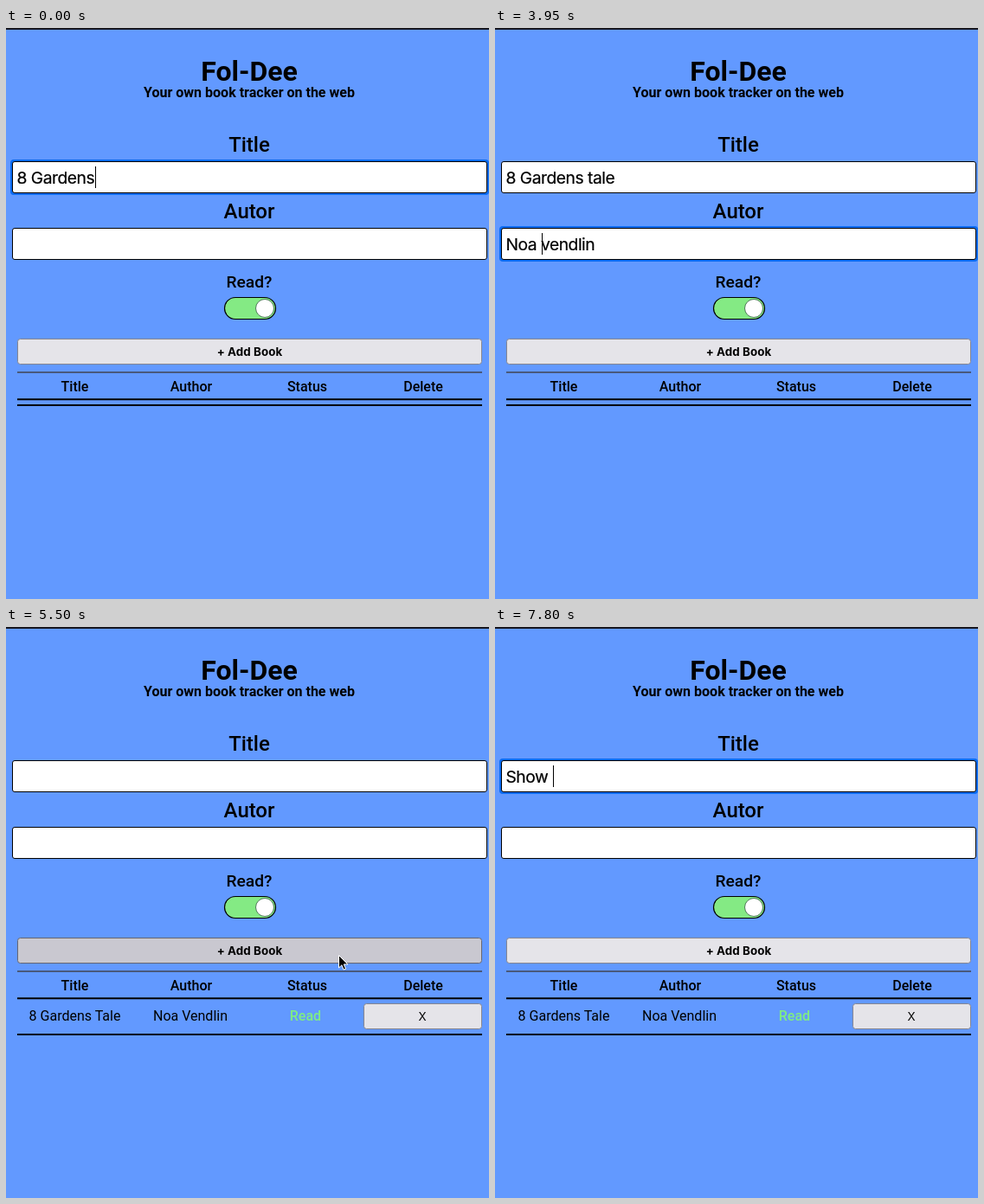
An HTML page for the animation above (8000 ms loop, 558 by 660 pixels).

```html
<!DOCTYPE html>
<html lang="en">
<head>
<meta charset="utf-8">
<title>Book tracker</title>
<style>
  html, body { margin: 0; width: 100%; height: 100%; overflow: hidden; background: #6299ff; }
  svg { display: block; }
  text { font: 16px Roboto, sans-serif; text-anchor: middle; white-space: pre; }
  .bold { font-weight: 700; }
  .medium { font-weight: 500; }
  .label { font-size: 24px; font-weight: 500; }
  .field { fill: #fff; stroke: #000; }
  .ring { fill: #0b6cf3; }
  .typed { font: 19.3px Inter, sans-serif; letter-spacing: -.5px; text-anchor: start; stroke: #000; stroke-width: .2; }
  .button { fill: #e5e4e9; stroke: #85858f; }
  .button.hover { fill: #c9c8d0; stroke: #666670; }
  .ui { font: 13.33px Inter, sans-serif; }
  .ui.bold { font-weight: 700; letter-spacing: .1px; }
</style>
</head>
<body>
<svg width="558" height="660" viewBox="0 0 558 660">
  <rect width="558" height="660" fill="#6299ff"/>
  <rect width="558" height="2" fill="#15161f"/>

  <text class="bold" x="281" y="61" style="font-size:32px">Fol-Dee</text>
  <text class="bold" x="281" y="80">Your own book tracker on the web</text>

  <text class="label" x="281" y="143">Title</text>
  <rect class="ring" id="titleRing" x="5" y="152" width="553" height="41" rx="4"/>
  <rect class="field" x="7.5" y="154.5" width="548" height="36" rx="2.5"/>
  <text class="typed" id="title" x="12.5" y="180"></text>

  <text class="label" x="281" y="220">Autor</text>
  <rect class="ring" id="authorRing" x="5" y="229" width="553" height="41" rx="4"/>
  <rect class="field" x="7.5" y="231.5" width="548" height="36" rx="2.5"/>
  <text class="typed" id="author" x="12.5" y="257"></text>
  <rect id="caret" width="1" height="25"/>

  <text class="medium" x="281" y="300" style="font-size:19.2px">Read?</text>
  <rect x="252.5" y="311.5" width="59" height="25" rx="12.5" fill="#84ea84" stroke="#000" stroke-width="1.2"/>
  <circle cx="299" cy="324" r="10.5" fill="#fff" stroke="#4f7b58"/>

  <rect class="button" id="add" x="13.5" y="359.5" width="536" height="29" rx="3"/>
  <text class="ui bold" x="281.5" y="379">+ Add Book</text>

  <path d="M13 398H550" stroke="#40444f" stroke-width="1.6"/>
  <path d="M13 429.3H550" stroke="#000" stroke-width="2"/>
  <text class="medium" x="79.5" y="420">Title</text>
  <text class="medium" x="214" y="420">Author</text>
  <text class="medium" x="348" y="420">Status</text>
  <text class="medium" x="482" y="420">Delete</text>
  <path id="tableEnd" d="M13 0H550" stroke="#000" stroke-width="2"/>
  <g id="row">
    <text x="79.5" y="455">8 Gardens Tale</text>
    <text x="213" y="455">Noa Vendlin</text>
    <text class="medium" x="346" y="455" fill="#7fec84">Read</text>
    <rect class="button" x="413.5" y="435.5" width="136" height="29" rx="3"/>
    <text class="ui" x="481" y="455">X</text>
  </g>

  <path id="arrow" d="M0 0V14.5L3.4 11.3 5.6 16.6 8 15.6 5.8 10.4H10.4Z" stroke="#fff"/>
  <path id="beam" d="M-3.5 -7.5Q0 -7.5 0 -5.5Q0 -7.5 3.5 -7.5M0 -6V6M-3.5 7.5Q0 7.5 0 5.5Q0 7.5 3.5 7.5M-2 1H2"
        fill="none" stroke="#000"/>
</svg>
<script>
const $ = id => document.getElementById(id);
const show = (id, on) => $(id).style.display = on ? '' : 'none';
const within = (t, a, b) => t >= a && t < b;

const LOOP = 8000, TAB = 1400, SUBMIT = 5350, REFOCUS = 5950;
const TITLE_KEYS = [50, 250, 400, 550, 700];
const AUTHOR_KEYS = [1650, 1850, 2000, 2250, 2550, 2650, 2750, 2900, 3150, 3250, 3350];
const NEXT_KEYS = [7100, 7200, 7250, 7350, 7750];
const BLINKS = [[1200, TAB], [3100, 3150], [4800, REFOCUS], [6400, 6950]];

const pressed = (keys, t) => keys.filter(k => k <= t).length;

function titleText(t) {
  if (t < SUBMIT) return '8 Gardens tale'.slice(0, 9 + pressed(TITLE_KEYS, t));
  return 'Show '.slice(0, pressed(NEXT_KEYS, t));
}

// The surname's first letter is removed and retyped as a capital.
function authorText(t) {
  if (t >= SUBMIT) return '';
  const initial = t < 4200 ? 'v' : t < 4300 ? '' : 'V';
  return ('Noa ' + initial + 'endlin').slice(0, pressed(AUTHOR_KEYS, t));
}

function pointerAt(t) {
  const glide = (a, b, from, to) => {
    const p = Math.min(1, Math.max(0, (t - a) / (b - a)));
    const e = p * p * (3 - 2 * p);
    return from.map((v, i) => v + (to[i] - v) * e);
  };
  return t < 5500 ? glide(5050, 5300, [310, 175], [384.5, 379.5])
                  : glide(5500, 5850, [384.5, 379.5], [164.5, 168.5]);
}

function draw(t) {
  const inTitle = t < TAB || t >= REFOCUS, inAuthor = within(t, TAB, SUBMIT);
  const submitted = t >= SUBMIT;
  $('title').textContent = titleText(t);
  $('author').textContent = authorText(t);
  show('titleRing', inTitle);
  show('authorRing', inAuthor);

  const field = inTitle ? $('title') : $('author');
  const length = field.textContent.length;
  const index = within(t, 3700, 4300) ? 4 : within(t, 4300, SUBMIT) ? 5 : length;
  const offset = index ? field.getSubStringLength(0, index) : 0;
  $('caret').setAttribute('x', Math.round(13 + offset));
  $('caret').setAttribute('y', inTitle ? 160 : 237);
  show('caret', !BLINKS.some(([a, b]) => within(t, a, b)));

  show('row', submitted);
  $('tableEnd').setAttribute('transform', `translate(0 ${submitted ? 471 : 436})`);

  const [x, y] = pointerAt(t), visible = within(t, 5050, 7100);
  const overField = within(y, 154, 192) || within(y, 231, 269);
  $('add').classList.toggle('hover', visible && within(y, 359, 390));
  for (const id of ['arrow', 'beam']) {
    show(id, visible && overField === (id === 'beam'));
    $(id).setAttribute('transform', `translate(${x} ${y})`);
  }
}

const start = performance.now();
function tick() {
  draw((performance.now() - start) % LOOP);
  requestAnimationFrame(tick);
}
tick();
</script>
</body>
</html>
```
